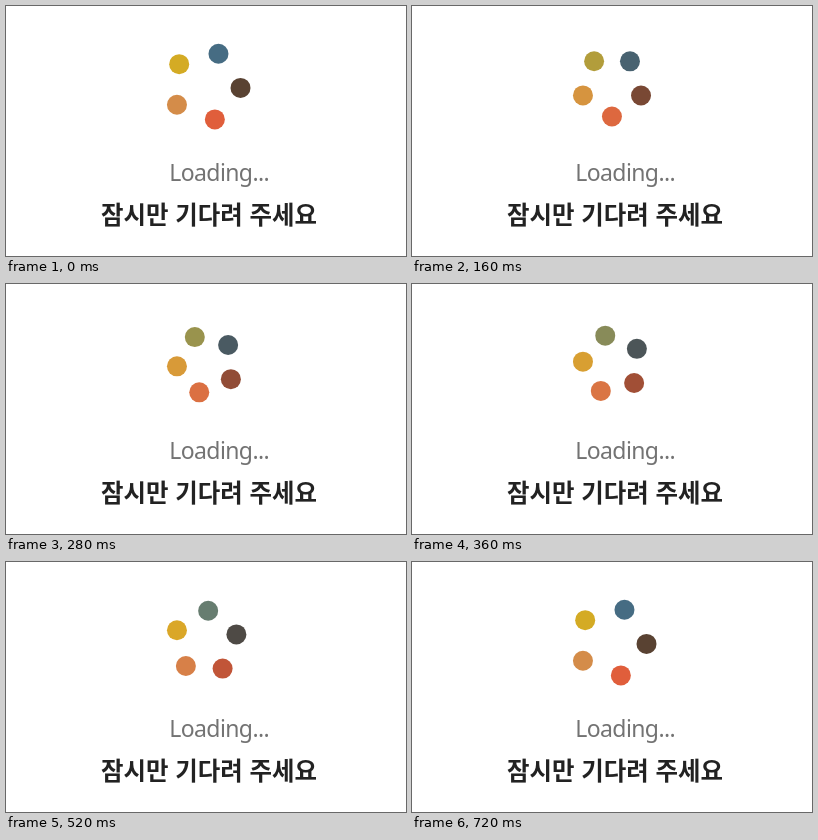
An HTML page that plays this animation: 400 px wide and 250 px high, repeating every 0.76 s.

```html
<!DOCTYPE html>
<html lang="ko">
<head>
<meta charset="utf-8">
<title>Loading</title>
<style>
  html, body { margin: 0; width: 100%; height: 100%; overflow: hidden; background: #fff; }
  svg { display: block; width: 100vw; height: 100vh; }
  .en { font: 400 23px "Noto Sans", sans-serif; letter-spacing: -0.6px; fill: #737373; }
  .ko { font: 700 24.45px "Noto Sans CJK KR", "Noto Sans CJK", sans-serif; fill: #222; }
</style>
</head>
<body>
<svg viewBox="0 0 400 250">
  <g id="dots"></g>
  <text class="en" x="163.3" y="174.8">Loading...</text>
  <text class="ko" x="95" y="217.8">잠시만 기다려 주세요</text>
</svg>
<script>
const STEP = 40, FRAMES = 19, SIDES = 5;
const CX = 200, CY = 80, R = 35.9;
// one colour per corner, clockwise from the right
const COLORS = [[81, 64, 50], [225, 91, 58], [212, 138, 76], [220, 175, 30], [69, 111, 136]];

const corners = COLORS.map((_, i) => {
  const a = i * 2 * Math.PI / SIDES;
  return [CX + R * Math.cos(a), CY + R * Math.sin(a)];
});
const group = document.getElementById('dots');
const dots = COLORS.map(() => {
  const c = document.createElementNS('http://www.w3.org/2000/svg', 'circle');
  c.setAttribute('r', 10);
  return group.appendChild(c);
});

// interpolate between neighbouring corners; p counts sides travelled
function along(list, p) {
  const i = Math.floor(p), f = p - i;
  const a = list[i % SIDES], b = list[(i + 1) % SIDES];
  return a.map((v, k) => v + (b[k] - v) * f);
}

function draw(ms) {
  const n = Math.floor(ms / STEP) % FRAMES;
  const p = (n + 1) / (FRAMES - 1);
  dots.forEach((dot, i) => {
    const [x, y] = along(corners, i + p);
    dot.setAttribute('cx', x.toFixed(2));
    dot.setAttribute('cy', y.toFixed(2));
    dot.setAttribute('fill', `rgb(${along(COLORS, i + p).map(Math.round)})`);
  });
}

const start = performance.now();
function tick() {
  draw(performance.now() - start);
  requestAnimationFrame(tick);
}
tick();
</script>
</body>
</html>
```
